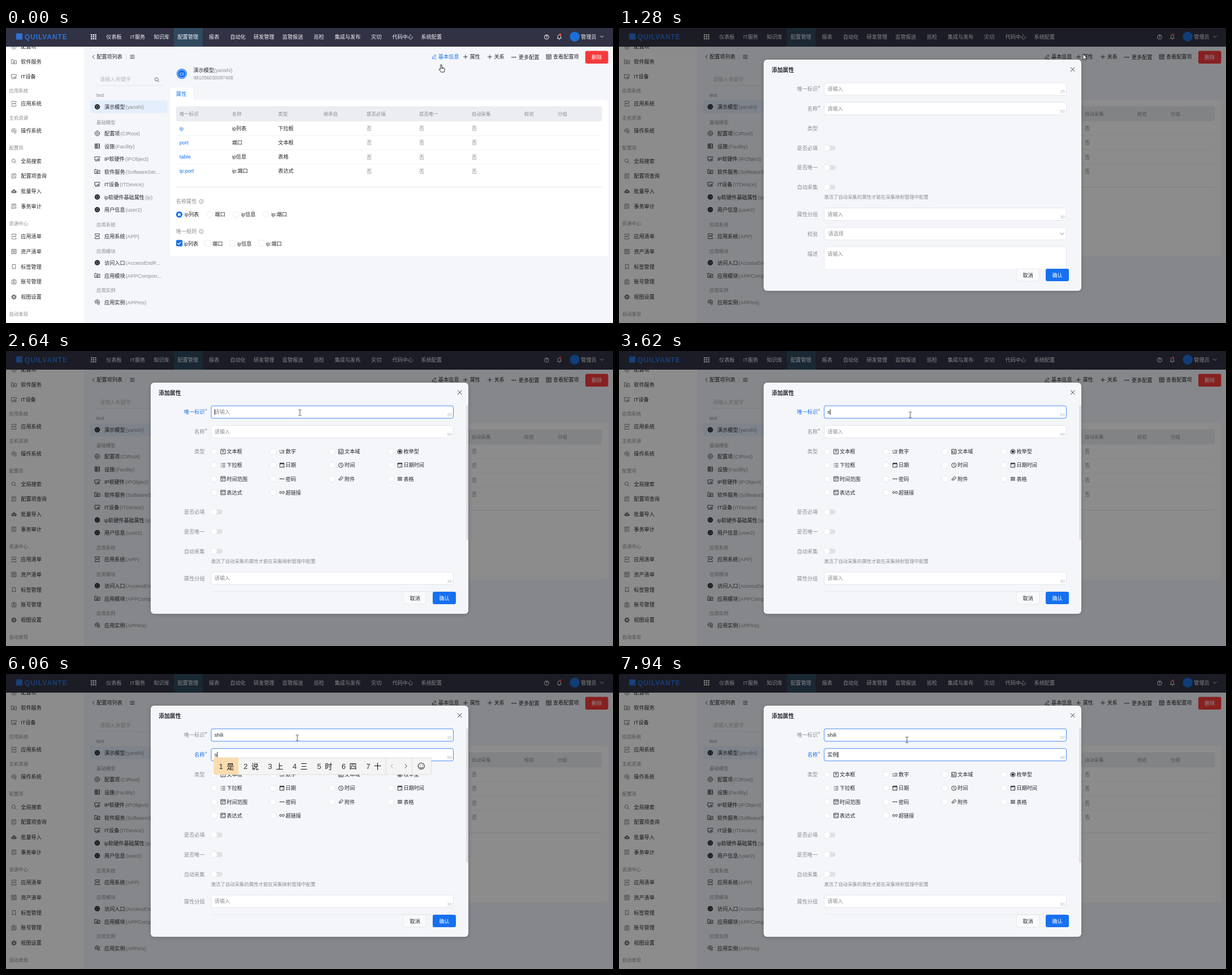
An HTML page for the animation above (8 s loop, 1074 px wide and 522 px high).

```html
<!DOCTYPE html>
<html lang="zh-CN">
<head>
<meta charset="utf-8">
<title>添加属性</title>
<style>
  html, body { margin: 0; width: 100%; height: 100%; overflow: hidden; background: #f4f6fa; }
  svg { display: block; width: 100vw; height: 100vh; }
  text { font-family: "Liberation Sans", "Noto Sans CJK SC", "Noto Sans CJK", sans-serif; white-space: pre; }
  .line { fill: none; stroke: currentColor; stroke-width: .9; }
</style>
</head>
<body>
<svg id="stage" viewBox="0 0 1074 522"></svg>
<script>
const INK = '#24262b', GREY = '#8b8d92', PALE = '#b4b6ba', BLUE = '#1670f0', EDGE = '#e2e4e8';
const MAIN = 9.15, SMALL = 8.42;

// ---------- drawing helpers ----------
const text = (x, cy, s, fill = INK, size = MAIN, more = '') =>
  `<text x="${x}" y="${(cy + size * .37).toFixed(2)}" font-size="${size}" fill="${fill}" ${more}>${s}</text>`;
const rect = (x, y, w, h, fill, r = 0, more = '') =>
  `<rect x="${x}" y="${y}" width="${w}" height="${h}" rx="${r}" fill="${fill}" ${more}/>`;
const disc = (x, y, r, fill, more = '') => `<circle cx="${x}" cy="${y}" r="${r}" fill="${fill}" ${more}/>`;
const path = (d, color, more = '') => `<path class="line" d="${d}" color="${color}" ${more}/>`;
const group = (id, body, more = '') => `<g id="${id}" ${more}>${body}</g>`;
const ring = (x, y, r) => `M${x - r} ${y}a${r} ${r} 0 1 0 ${2 * r} 0a${r} ${r} 0 1 0 ${-2 * r} 0`;
const box = (w, h) => `M${-w} ${-h}h${2 * w}v${2 * h}h${-2 * w}z`;

const ICONS = {
  folder: 'M-4.5-3.5h3l1 1.5h5v5.7h-9zM-1.5 0h3v2h-3z',
  monitor: 'M-1 2h-3.5v-5.5h9v2.5M-3.5 4h3' + ring(2, 1.8, 2) + ring(2, 1.8, .5),
  app: 'M-3.8-1.8v-2.5h7.6v2.5M-3.8 1.8v2.5h7.6v-2.5M-4 .8l1-1.8 1 1.8M-.8 1v-2h1v1h-1M2 1v-2h1.2v1h-1',
  hex: 'M-1.3-4h2.6l2.5 2v2.5M-1.3-4l-2.7 2v3l2.5 2.3' + ring(-.3, -.5, 1.5) + ring(2.2, 2.5, 1.7),
  search: ring(-.7, -.7, 3) + 'M1.5 1.5L4.2 4.2',
  list: 'M3.5-.5v-3.5h-7v8h3.5M-1.8-2h3.6M-1.8 0h2.5M-1.8 2h1' + ring(2.3, 2.3, 1.5),
  table: box(4, 4) + 'M-4-1.8h8M-2.5 0h5M-2.5 2h5',
  mark: 'M-2.8-4h5.6v8l-2.8-2-2.8 2z',
  badge: 'M-3.7-3h7.4v7h-7.4zM-1.5-4.2h3M-2.2 3l2.2-1.8 2.2 1.8' + ring(0, -.4, 1.2),
  server: box(4, 4) + 'M-4-1.3h8M-4 1.3h8M-2.5-2.7h3M-2.5 0h3M-2.5 2.7h3',
  rings: ring(0, 0, 4.2) + ring(0, 0, 1.8),
  pencil: 'M-3.5 3.2l.6-2.5 4.6-4.6 1.9 1.9-4.6 4.6zM0 3.8h4',
  plus: 'M-3.8 0h7.6M0-3.8v7.6',
  boxT: box(4, 4) + 'M-2-1.8h4M0-1.8v4',
  digits: 'M-3.5-2.5v3M-1-2.5h1.5v3M2-2.5h1.5v3h-1.5M-4 2.5h8',
  area: box(4, 4) + 'M-2.2-2v4M0-2h2.3M0 0h2.3M-2.2 2h4.5',
  bullets: 'M-4-3h1.3M-4 0h1.3M-4 3h1.3M-1.5-3h5.5M-1.5 0h5.5M-1.5 3h5.5',
  day: box(3.7, 3.7) + 'M-3.7-3h7.4M-3.7-2.2h7.4M-2-4.5v2M2-4.5v2M.5 1.5h1.7',
  clock: ring(0, 0, 4) + 'M0-2.3v2.5l2 1.2',
  span: box(4, 4) + 'M-4-2h8M-2 0h1.5M.5 0h2M-2 2h2',
  clip: 'M-2.8 2.8q-1.8-1.8 0-3.4l3-2.7q1.8-1.2 2.9.2t-.4 2.8l-3 2.6q-1 .6-1.5-.1t.2-1.3l2.5-2.3',
  rows: 'M-4-2.7h8M-4-.9h8M-4 .9h8M-4 2.7h8',
  formula: box(4, 4) + 'M-4-1.8h8M-2.3 0l1.5 1-1.5 1M.5 2h2',
  link: 'M-.8-1.8h-1.5q-1.9 0-1.9 1.8t1.9 1.8h1.5M.8-1.8h1.5q1.9 0 1.9 1.8t-1.9 1.8h-1.5M-1.8 0h3.6',
  burger: 'M-4-2.7h8M-4 0h8M-4 2.7h8',
  cross: 'M-3.7-3.7l7.4 7.4M3.7-3.7l-7.4 7.4',
  down: 'M-3-1.5l3 3 3-3', left: 'M2-3.2l-3.2 3.2 3.2 3.2', right: 'M-1.5-3.5l3.5 3.5-3.5 3.5',
};
const FILLED = {
  dot: c => disc(0, 0, 4.7, c) + disc(0, 0, 2.3, 'none', 'stroke="#bbb" stroke-width=".7"'),
  cloud: c => `<path fill="${c}" d="M-2.5 3.2q-2.2-.2-2.2-2.2t2-2.2q.6-2.3 2.8-2.3t2.7 2.3q2 .2 2 2.2t-2.3 2.2z"/>` + path('M0 2v-2.7M-1.3.5l1.3-1.3 1.3 1.3', '#fff'),
  gear: c => disc(0, 0, 2.6, 'none', `stroke="${c}" stroke-width="2"`) + disc(0, 0, 4, 'none', `stroke="${c}" stroke-width="1.4" stroke-dasharray="1.6 1.54"`),
  dots: c => [-3, 0, 3].map(x => disc(x, 0, 1, c)).join(''),
  radio: c => disc(0, 0, 4, 'none', `stroke="${c}"`) + disc(0, 0, 2.3, c),
};
const icon = (name, x, y, c = INK) =>
  `<g transform="translate(${x} ${y})">${FILLED[name] ? FILLED[name](c) : path(ICONS[name], c)}</g>`;
const radio = (x, y, on) => on
  ? disc(x, y, 5.6, BLUE) + disc(x, y, 2.6, '#fff')
  : disc(x, y, 5.3, '#fff', `stroke="${EDGE}" stroke-width=".8"`);

// ---------- page ----------
function sidebar() {
  const items = [
    [33, '配置项', 'rings'], [59.5, '软件服务', 'folder'], [86, 'IT设备', 'monitor'], [111, '应用系统'],
    [134, '应用系统', 'app'], [158.5, '主机资源'], [182, '操作系统', 'hex'], [212, '配置项'],
    [235.5, '全局搜索', 'search'], [262, '配置项查询', 'list'], [289, '批量导入', 'cloud'], [315.5, '事务审计', 'list'],
    [345.5, '资源中心'], [369, '应用清单', 'app'], [395.5, '资产清单', 'table'], [422.5, '标签管理', 'mark'],
    [449, '账号管理', 'badge'], [476, '视图设置', 'gear'], [506, '自动发现']];
  return rect(0, 33, 138, 489, '#fff') + items.map(([y, s, i]) =>
    i ? icon(i, 14, y, '#6c6e73') + text(26.3, y, s) : text(5.5, y, s, GREY, SMALL)).join('');
}

function header() {
  const nav = [[177.3, '仪表板'], [219.8, 'IT服务'], [261.5, '知识库'], [303.7, '配置管理'], [359, '报表'],
    [396.5, '自动化'], [438.2, '研发管理'], [489, '监管报送'], [544.5, '巡检'], [581.7, '集成与发布'],
    [646, '灾切'], [683.6, '代码中心'], [734.5, '系统配置'], [1017.3, '管理员']];
  let s = rect(0, 0, 1074, 33, '#313244') + rect(297, 0, 51, 33, '#30495f');
  s += rect(18, 9.5, 11, 11, '#2c72d8');
  s += text(33, 15.2, 'QUILVANTE', '#2c72d8', 12, 'font-weight="700" letter-spacing=".9"');
  for (let i = 0; i < 9; i++) s += rect(150 + i % 3 * 3.7, 11 + (i / 3 | 0) * 3.5, 2.4, 2.2, '#fff');
  s += nav.map(([x, t]) => text(x, 15.5, t, '#f4f5f8')).join('');
  s += disc(956.5, 16, 4, 'none', 'stroke="#fff" stroke-width=".9"') + text(956.5, 16, '?', '#fff', 6.5, 'text-anchor="middle" font-weight="700"');
  s += path('M975.5 18.5h7l-1-1.5v-2.5q0-2.3-2.5-2.3t-2.5 2.3v2.5zM978 20.3h2', '#fff') + disc(980.5, 11.5, 2, '#f04444');
  return s + disc(1006.3, 15.2, 8.7, '#1d6fd8') + icon('down', 1054.3, 15.2, '#fff');
}

function models() {
  const items = [
    [119, 'test'], [140, '演示模型', 'yanshi)', 'dot'], [166.5, '基础模型'], [187, '配置项', 'CIRoot)', 'rings'],
    [209.5, '设施', 'Facility)', 'server'], [232, 'IP软硬件', 'IPObject)', 'monitor'],
    [254.3, '软件服务', 'SoftwareSer...', 'folder'], [277, 'IT设备', 'ITDevice)', 'monitor'],
    [299.5, 'ip软硬件基础属性', 'ip)', 'dot'], [322, '用户信息', 'user2)', 'dot'], [348, '应用系统'],
    [369, '应用系统', 'APP)', 'app'], [395, '应用模块'], [415.8, '访问入口', 'AccessEndP...', 'dot'],
    [438.2, '应用模块', 'APPCompon...', 'folder'], [464, '应用实例'], [485.5, '应用实例', 'APPIns)', 'hex']];
  return rect(149, 128, 136.5, 22.5, '#e4eefc', 2) +
    text(166, 90.5, '请输入关键字', PALE) + icon('search', 267, 91.5, '#55575c') + rect(160, 101.5, 117, .8, '#dcdee3') +
    items.map(([y, a, b, i]) => i
      ? icon(i, 161.5, y - .5) + text(174, y, `${a}<tspan dx="1" fill="${GREY}">(${b}</tspan>`)
      : text(160, y, a, GREY, SMALL)).join('');
}

function toolbar() {
  const tool = (id, i, x, s, tx, y = 51) => group(id, icon(i, x, y, 'currentColor') + text(tx, y, s, 'currentColor'), `color="${INK}"`);
  return icon('left', 154.5, 51) + text(160.3, 51, '配置项列表') + rect(212, 46, .8, 10, '#d4d6da') + icon('burger', 223.5, 51) +
    tool('edit', 'pencil', 757.5, '基本信息', 765) + tool('attr', 'plus', 813, '属性', 820.7) +
    tool('rel', 'plus', 856, '关系', 863.7) + tool('more', 'dots', 898.5, '更多配置', 907, 51.8) +
    tool('view', 'table', 960.3, '查看配置项', 968) +
    rect(1025, 40.5, 40.5, 22.5, '#f53a3c', 3) + text(1045.2, 52, '删除', '#fff', MAIN, 'text-anchor="middle"');
}

function card() {
  const cols = [307, 400, 481.5, 561.7, 638, 731, 824, 917, 976];
  const heads = ['唯一标识', '名称', '类型', '继承自', '是否必填', '是否唯一', '自动采集', '校验', '分组'];
  const rows = [['ip', 'ip列表', '下拉框'], ['port', '端口', '文本框'], ['table', 'ip信息', '表格'], ['ip:port', 'ip:端口', '表达式']];
  const names = rows.map(r => r[1]);
  let s = disc(311, 81, 9, BLUE) + disc(311, 81, 7.2, 'none', 'stroke="#fff" stroke-width=".8"') +
    text(311, 81, 'CI', '#fff', 7.5, 'text-anchor="middle"') +
    text(331.5, 75, `演示模型<tspan fill="${GREY}">(yanshi)</tspan>`) + text(331.7, 87.5, '981056030097408', GREY, SMALL);
  s += rect(290, 105.5, 41, 30, '#fff', 4) + rect(290, 127, 775.5, 277, '#fff', 6) + text(301, 117, '属性', BLUE);
  s += rect(301, 138.5, 753.5, 26.7, '#ecedf1', 4) + heads.map((h, i) => text(cols[i], 152.2, h, GREY, SMALL)).join('');
  rows.forEach((r, i) => {
    const y = 177.4 + i * 25.2;
    s += r.map((v, k) => text(cols[k], y, v, k ? INK : BLUE)).join('');
    s += [4, 5, 6].map(k => text(cols[k], y + .5, '否', GREY)).join('');
    if (i < 3) s += rect(301, y + 12.4, 753.5, .7, '#eceef1');
  });
  s += rect(301, 281, 753.5, .8, '#dfe1e5');
  [[306.5, '名称属性'], [359.5, '唯一规则']].forEach(([y, t]) => {
    s += text(300.8, y, t, GREY) + path(ring(345.5, y + .5, 3.6) + `M345.5 ${y}v2.6M345.5 ${y - 1.7}v1`, GREY);
  });
  [306.5, 360, 406.7, 460].forEach((x, i) => { s += radio(x, 330, !i) + text(x + 9.6, 330, names[i]); });
  [301, 351.5, 395.5, 446.2].forEach((x, i) => {
    s += rect(x + .4, 375.4, 10.5, 10.5, i ? '#fff' : BLUE, 1.5, `stroke="${i ? EDGE : BLUE}" stroke-width=".8"`) +
      text(x + 13.8, 381.2, names[i]);
  });
  return s + path('M303.3 380.6l2.3 2.4 4-4.4', '#fff', 'style="stroke-width:1.3"');
}

// ---------- dialog ----------
const label = (y, s) => text(351.6, y, s, 'currentColor', MAIN, 'text-anchor="end"');
const field = (id, y, h = 22) => rect(363, y, 428.5, h, '#fff', 3, `id="${id}" stroke="${EDGE}" stroke-width=".9"`);
const count = (id, y, n) => text(789, y, n, PALE, 7.7, `text-anchor="end" id="${id}"`);
const hint = (id, y) => text(368.8, y, '请输入', GREY, MAIN, `id="${id}"`);
const caret = (id, y) => rect(369, y, .9, 10, '#111', 0, `id="${id}"`);

function keyField(key, y, name, max) {
  return group(key + 'Label', label(y + .3, name) + text(351.9, y - 1.2, '*', GREY, 10), `color="${GREY}"`) +
    field(key + 'Box', y - 10.8) + hint(key + 'Hint', y) + text(368.8, y, '', INK, MAIN, `id="${key}Text"`) +
    caret(key + 'Caret', y - 4.8) + count(key + 'Count', y + 4.8, max);
}

function kinds() {
  const list = [['boxT', '文本框'], ['digits', '数字'], ['area', '文本域'], ['radio', '枚举型'], ['bullets', '下拉框'], ['day', '日期'],
    ['clock', '时间'], ['day', '日期时间'], ['span', '时间范围'], ['dots', '密码'], ['clip', '附件'], ['rows', '表格'], ['formula', '表达式'], ['link', '超链接']];
  return list.map(([i, s], n) => {
    const x = 368.3 + n % 4 * 104.3, y = 178 + (n >> 2) * 24.1;
    return radio(x, y) + icon(i, x + 15.7, y) + text(x + 22.2, y, s);
  }).join('');
}

function lower() {
  const sw = [[212.2, '是否必填'], [246.9, '是否唯一'], [281.6, '自动采集']].map(([y, s]) => label(y, s) +
    rect(364, y - 4.2, 19, 8.4, '#e0e1e4', 4.2) + disc(368, y, 5.5, '#fff', 'stroke="#e3e4e7" stroke-width=".7"')).join('');
  return sw + text(362.7, 299, '激活了自动采集的属性才能在采集映射管理中配置', GREY, SMALL) +
    label(329.8, '属性分组') + field('groupBox', 318.5) + hint('groupHint', 329.5) + count('groupCount', 334.3, 30) +
    label(364.7, '校验') + field('checkBox', 353) + text(370, 363.7, '请选择', GREY) + icon('down', 784, 364, '#55575c') +
    label(399.4, '描述') + field('noteBox', 387, 60) + hint('noteHint', 399.7);
}

function dialog() {
  const button = (x, s, bg, fg, more) => rect(x, 426, 41, 22, bg, 3, more) +
    text(x + 20.5, 437.2, s, fg, MAIN, 'text-anchor="middle"');
  return rect(0, 0, 1074, 522, '#000', 0, 'opacity=".45"') +
    rect(256, 56, 562, 409, '#f5f6fa', 6, 'style="filter:drop-shadow(0 1px 3px #0003)"') +
    text(270, 74, '添加属性', INK, 9.9, 'font-weight="700"') + icon('cross', 802.7, 73.3) +
    `<g clip-path="url(#body)" color="${GREY}">` + keyField('id', 107.8, '唯一标识', 25) + keyField('name', 142.6, '名称', 50) +
    label(177.8, '类型') + group('kinds', kinds()) + group('lower', lower()) + '</g>' +
    rect(814.5, 96, 3.2, 238, '#d9dade', 1.5, 'id="bar"') +
    button(703, '取消', '#f9fafc', INK, `stroke="${EDGE}" stroke-width=".8"`) + button(755, '确认', BLUE, '#fff', '');
}

// Input-method candidate strip
function strip(words) {
  let x = 368, s = '';
  words.forEach((w, i) => {
    const width = 43.4 + 12.35 * (w.length - 1);
    if (!i) s += rect(x, 148, width, 30, '#fbdcaf');
    s += text(x + 8.8, 163, i + 1, '#333', 13.2) + text(x + 22.6, 163, w, '#111', 13);
    x += width;
  });
  const more = rect(x, 148, .8, 30, '#d8d8d8') + icon('left', x + 10.5, 163, '#999') + icon('right', x + 35.5, 163) +
    rect(x + 46, 148, .8, 30, '#d8d8d8') +
    path(ring(x + 63, 163, 5.5) + `M${x + 60} 164.5q3 3.5 6 0M${x + 60.8} 161.5h1M${x + 64.2} 161.5h1`, INK, 'style="stroke-width:1.1"');
  return rect(368, 148, x + 80.5 - 368, 30, '#f4f4f4', 1, 'stroke="#d4d4d4" stroke-width=".7"') + s + more;
}

const pointers = {
  hand: '<path fill="#fff" stroke="#111" stroke-width=".9" d="M-1.2 1a1.2 1.2 0 0 1 2.4 0v4l4 1.1q1 .4 1 1.6v2.2l-1.2 3.1h-5.3l-3.3-4.4q-.5-1.3.8-1.5l1.6 1.2zM1.2 5v2.3M3 5.5v1.8"/>',
  arrow: '<path fill="#fff" stroke="#111" stroke-width=".8" d="M0 0v10.2l2.4-2.2 1.6 3.6 1.5-.7-1.6-3.5h3.3z"/>',
  beam: path('M-2.6-5h2l.6.5.6-.5h2M0-4.5v9M-2.6 5h2l.6-.5.6.5h2', '#444'),
};

const stage = document.getElementById('stage');
stage.innerHTML = '<defs><clipPath id="body"><rect x="256" y="90" width="562" height="336"/></clipPath></defs>' +
  rect(0, 0, 1074, 522, '#f4f6fa') + sidebar() + models() + toolbar() + card() + header() +
  group('dialog', dialog()) + group('strip', '') + group('pointer', Object.keys(pointers).map(k => group(k, pointers[k])).join(''));

// ---------- timeline ----------
const LOOP = 8000;
const moves = [
  [0, 770, 65, 'hand'], [70, 776, 62, 'hand'], [150, 791, 55, 'hand'], [230, 805, 50, 'arrow'], [320, 815, 47, 'hand'],
  [400, 821, 46, 'hand'], [1110, 821, 46, 'arrow'], [1740, 780, 51, 'arrow'], [1820, 680, 65, 'arrow'], [1900, 593, 86, 'arrow'],
  [1980, 553, 98.7, 'beam'], [2060, 541, 102, 'beam'], [2140, 533, 104, 'beam'], [2210, 527, 105, 'beam'], [2290, 523, 106, 'beam'],
  [2360, 522, 106, 'beam'], [2610, 520, 109, 'beam'], [2690, 517, 112, 'beam'], [2770, 515.3, 113, 'beam'],
  [7450, 513, 114, 'beam'], [7530, 511, 115.5, 'beam'], [7600, 509.5, 116.5, 'beam']];
const idKeys = [[0, ''], [3620, 's'], [3700, 'sh'], [3850, 'shi'], [4080, 'shil'], [4160, 'shili']];
const nameKeys = [[0, ''], [6060, 's'], [6220, 'sh'], [6300, 'shi'], [6380, 'shil'], [6550, 'shili'], [6840, '实例']];
const words = {
  s: '是 说 上 三 时 四 十', sh: '是 说 上 时 谁 手 水', shi: '是 时 事 十 使 市 式',
  shil: '实力 是来自 示例 势力 十六个 失联 市里', shili: '示例 实例 实力 势力 视力 失利 市里',
};
const advance = { s: .5, h: .556, i: .222, l: .222, 实: 1, 例: 1 };

const at = (track, t) => track.filter(k => k[0] <= t).pop();
const within = (t, ...spans) => spans.some(([a, b]) => t >= a && t < b);
const $ = id => document.getElementById(id);
const show = (id, on) => $(id).style.display = on ? '' : 'none';
const tint = (id, on) => $(id).setAttribute('color', on ? BLUE : id.endsWith('Label') ? GREY : INK);
const frame = (id, on) => $(id).setAttribute('stroke', on ? '#2f7ef2' : EDGE);

function fill(key, value, left, caretOn) {
  $(key + 'Text').textContent = value;
  $(key + 'Count').textContent = left;
  show(key + 'Hint', !value);
  show(key + 'Caret', caretOn);
  $(key + 'Caret').setAttribute('x', 368.9 + MAIN * [...value].reduce((w, c) => w + advance[c], 0));
}

function render(t) {
  const [, x, y, kind] = at(moves, t);
  $('pointer').setAttribute('transform', `translate(${x} ${y})`);
  for (const k in pointers) show(k, k === kind);

  tint('edit', t < 230);
  tint('attr', within(t, [320, 1280]));
  show('dialog', t >= 1280);

  const loaded = t >= 1740;
  show('kinds', loaded);
  show('bar', loaded);
  $('lower').setAttribute('transform', `translate(0 ${loaded ? 72.6 : 0})`);

  tint('idLabel', within(t, [2530, 4620]));
  tint('nameLabel', t >= 4620);
  frame('idBox', t >= 2060);
  frame('nameBox', t >= 4620);

  const id = at(idKeys, t)[1], name = at(nameKeys, t)[1];
  fill('id', id, 25 - id.length, within(t, [2530, 3060], [3620, 4620]));
  fill('name', name, t < 6840 ? 50 : 48, within(t, [4620, 5190], [5740, 7370], [7940, LOOP]));

  const open = words[name] || '';
  if ($('strip').dataset.words !== open) {
    $('strip').dataset.words = open;
    $('strip').innerHTML = open && strip(open.split(' '));
  }
}

const start = performance.now();
function tick() {
  render((performance.now() - start) % LOOP);
  requestAnimationFrame(tick);
}
tick();
</script>
</body>
</html>
```
